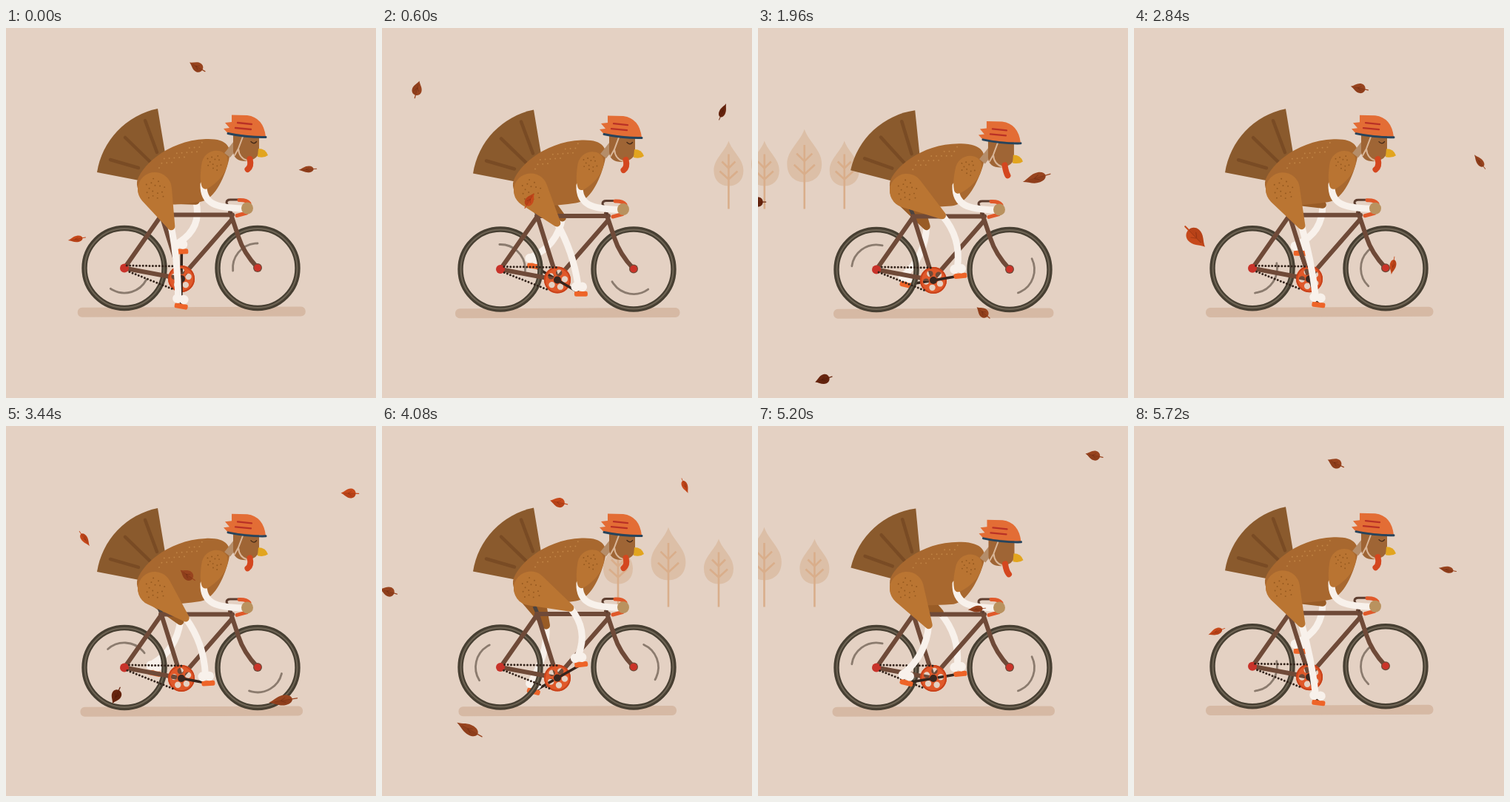
Animation of 500 by 500 pixels, one loop 5760 ms. Source, as an HTML page with a canvas:

```html
<!DOCTYPE html>
<html lang="en">
<head>
<meta charset="utf-8">
<title>Turkey ride</title>
<style>
html, body { margin: 0; width: 100%; height: 100%; overflow: hidden; background: #e4d1c3; }
canvas { display: block; width: 500px; height: 500px; }
</style>
</head>
<body>
<canvas id="stage" width="500" height="500"></canvas>
<script>
const ctx = document.getElementById('stage').getContext('2d');
const LOOP = 5760, TAU = Math.PI * 2, RAD = Math.PI / 180;
const FRAME = '#6f4a38', ORANGE = '#e0592a', WHITE = '#f8f1eb', THIGH = '#ba7532';

function fill(shape, color) {
  ctx.fillStyle = color;
  ctx.fill(typeof shape === 'string' ? new Path2D(shape) : shape, 'evenodd');
}
function line(path, color, width, cap = 'round') {
  ctx.strokeStyle = color;
  ctx.lineWidth = width;
  ctx.lineCap = cap;
  ctx.lineJoin = 'round';
  ctx.stroke(new Path2D(path));
}
function circle(x, y, r) {
  const p = new Path2D();
  p.arc(x, y, r, 0, TAU);
  return p;
}
function ring(x, y, r, color, width, from = 0, to = TAU) {
  ctx.beginPath();
  ctx.arc(x, y, r, from, to);
  ctx.strokeStyle = color;
  ctx.lineWidth = width;
  ctx.lineCap = 'round';
  ctx.stroke();
}
function at(x, y, deg, draw) {
  ctx.save();
  ctx.translate(x, y);
  ctx.rotate(deg * RAD);
  draw();
  ctx.restore();
}
const mix = (a, b, k) => a + (b - a) * k;
function smooth(a, b, t) {
  const k = Math.min(1, Math.max(0, (t - a) / (b - a)));
  return k * k * (3 - 2 * k);
}

// Background trees: [time, middle x at that time, spacing]
const groves = [[1120, 347, 54], [4720, 171, 68]];

function tree(x, size) {
  ctx.save();
  ctx.translate(x, 244.5);
  ctx.scale(size, size);
  fill('M0-92C5-77 20-68 20-52C20-38 11-31 0-31S-20-38-20-52C-20-68-5-77 0-92Z', '#dcbfa7');
  line('M0 0V-74M-12-51L0-40L12-51M-9-64L0-55L9-64', '#d9ae8b', 2.6 / size, 'butt');
  ctx.restore();
}
function trees(t) {
  for (const [t0, x0, gap] of groves) {
    const x = x0 - (t - t0) * 0.338;
    tree(x - gap, 1);
    tree(x, 1.17);
    tree(x + gap, 1);
  }
}

// Leaves: size, a look per key (lower case = seen edge-on), keys of [time, x, y, degrees]
const leaves = [
  [1, 'RRRR', [5040, 510, 34, 10], [5440, 369, 48, 15], [5720, 272, 50, 25], [5760, 258, 52, 30]],
  [1, 'rrO', [5720, 423, 194, 12], [5760, 407, 191, -4], [6880, 21, 268, 230]],
  [1, 'roo', [4720, 465, 219, 10], [5720, 111, 278, -22], [5760, 95, 285, -10]],
  [1, 'dD', [1120, 284, 159, 70], [1960, -2, 235, 0]],
  [1, 'oD', [1120, 374, 400, -70], [1200, 347, 418, -60], [1960, 88, 475, -18]],
  [1.6, 'rO', [1960, 375, 203, -16], [2840, 84, 283, -134]],
  [0.95, 'R', [1960, 304, 384, 40]],
  [1, 'RRo', [2400, 455, 97, -10], [2840, 304, 81, 12], [3440, 107, 153, 235]],
  [1, 'rR', [2840, 467, 180, 52], [3440, 245, 201, 35]],
  [1, 'oD', [2840, 350, 322, -80], [3440, 149, 365, -65]],
  [1, 'OOD', [3440, 464, 91, 2], [3700, 372, 71, 20], [4720, 13, 157, 0]],
  [1.6, 'r', [3440, 373, 371, -9]],
  [0.9, 'o', [4720, 154, 120, -75]]
];
const leafColor = { O: '#c6491b', R: '#98441f', D: '#68260f' };

function leaf(t, [size, looks, ...keys]) {
  let i = 0;
  while (i < keys.length - 2 && t > keys[i + 1][0]) i++;
  const a = keys[i];
  const b = keys[i + 1] || [a[0] + 1000, a[1] - 400, a[2] + 60, a[3] + 60];
  const k = (t - a[0]) / (b[0] - a[0]);
  const [x, y, deg] = [1, 2, 3].map(n => mix(a[n], b[n], k));
  if (x < -30 || x > 530) return;
  const lookA = looks[Math.min(i, looks.length - 1)];
  const lookB = looks[Math.min(i + 1, looks.length - 1)];
  const flat = c => c < 'a' ? 1 : 0.66;
  const squash = mix(flat(lookA), flat(lookB), Math.min(1, Math.max(0, k)));
  at(x, y, deg, () => {
    ctx.scale(size, size * squash);
    const color = leafColor[(k < 0.5 ? lookA : lookB).toUpperCase()];
    fill('M-11 0C-6-2-3-7 3-6.5C7-6 9-3 9 0C9 3 7 6 3 6.5C-3 7-6 2-11 0Z', color);
    fill('M-11 0H9C9 3 7 6 3 6.5C-3 7-6 2-11 0Z', 'rgba(60,10,0,.1)');
    line('M-7 0H13', color, 1.3);
    line('M-6 0H8M-1 0L3-3M-1 0L3 3', 'rgba(50,10,0,.25)', 0.7);
  });
}

function wheel(x, deg) {
  ring(x, 324.5, 54, '#473f32', 7.4);
  ring(x, 324.5, 53.5, '#6e6454', 2);
  ring(x, 324.5, 33.5, '#8b7b6e', 2.8, (deg - 48) * RAD, (deg + 48) * RAD);
}

const CRANK = { x: 237, y: 339, r: 37 };
const pedalAt = a => [CRANK.x + CRANK.r * Math.cos(a), CRANK.y + CRANK.r * Math.sin(a)];

function crankArm(a) {
  const [x, y] = pedalAt(a);
  line(`M${CRANK.x} ${CRANK.y}L${x} ${y}`, '#35251d', 3.6);
}

// Tapered shape around two circles
function taper(x1, y1, r1, x2, y2, r2) {
  const dir = Math.atan2(y2 - y1, x2 - x1);
  const open = Math.acos((r1 - r2) / Math.hypot(x2 - x1, y2 - y1));
  const p = new Path2D();
  p.arc(x1, y1, r1, dir + open, dir - open + TAU);
  p.arc(x2, y2, r2, dir - open, dir + open);
  p.closePath();
  return p;
}

function leg(a, hipX, hipY, near) {
  const sin = Math.sin(a), cos = Math.cos(a);
  const [px, py] = pedalAt(a);
  const bend = (41 + 25 * sin - 8 * cos + 6 * cos * cos) * RAD;
  const len = 58 - 3 * sin;
  const kx = hipX + len * Math.cos(bend), ky = hipY + len * Math.sin(bend);
  const ax = px - 4, ay = py - 12;
  const dx = ax - kx, dy = ay - ky, dist = Math.hypot(dx, dy);
  const bulge = Math.max(0, 105 - dist) * 0.5 / dist;
  line(`M${kx} ${ky}Q${(kx + ax) / 2 + dy * bulge} ${(ky + ay) / 2 - dx * bulge} ${ax} ${ay}`, WHITE, 9);
  at(px, py, 4 + 6 * sin - 9 * cos, () => {
    ctx.beginPath();
    ctx.roundRect(-9, -3.5, 18, 7, 2.5);
    ctx.fillStyle = '#ee6428';
    ctx.fill();
    fill(circle(-7, -9.5, 6.3), WHITE);
    fill(circle(2, -9.5, 6.3), WHITE);
  });
  fill(taper(hipX, hipY, near ? 23 : 20, kx, ky, 5), near ? THIGH : '#995c26');
  if (near) dots(hipX, hipY, 15, 16, '#95591f');
}

// Sunflower scatter of speckles
function dots(x, y, r, count, color) {
  for (let i = 1; i <= count; i++) {
    const d = r * Math.sqrt(i / count), a = i * 2.4;
    fill(circle(x + d * Math.cos(a), y + d * Math.sin(a), 0.95), color);
  }
}

function bike(t, a) {
  const spin = t % 360;
  wheel(160, 75 + spin);
  wheel(340, 221 + spin);
  line('M206 242L212 256', '#4b4340', 5, 'butt');
  line('M160 324.5L210 253L237 339ZM209 252.5H306M237 337L305 259', FRAME, 6);
  line('M303 249L314 282Q321 304 340 324', FRAME, 6);
  line('M304 250L298 236Q298 232 303 232H315', '#5d3e30', 3);
  line('M315 232.5Q325 232 329 237M312 253.5L325 250', ORANGE, 5);
  fill(circle(160, 324.5, 6), '#c8332a');
  fill(circle(340, 324, 6), FRAME);
  fill(circle(340, 324, 4.8), '#cb3429');

  const gear = circle(CRANK.x, CRANK.y, 18);
  for (let i = 0; i < 5; i++) {
    const h = a + Math.PI / 5 + i * TAU / 5;
    gear.addPath(circle(CRANK.x + 10 * Math.cos(h), CRANK.y + 10 * Math.sin(h), 4.2));
  }
  fill(gear, ORANGE);
  ring(CRANK.x, CRANK.y, 17, '#c9421a', 2);
  ctx.setLineDash([0, 4.4]);
  ctx.lineDashOffset = -t * 0.157;
  line('M163 321L237 322', '#33231a', 3);
  ctx.lineDashOffset = t * 0.157;
  line('M163 328L226 353', '#33231a', 3);
  ctx.setLineDash([]);
  crankArm(a);
  fill(circle(CRANK.x, CRANK.y, 5), '#3a2820');
}

function head(lean) {
  line('M299 172L311 157', '#b58d69', 10, 'butt');
  fill('M307 141V167Q308 180 324 180Q342 178 342 165V145Z', '#9f6535');
  line('M320 147L314 163L309 172M314 163Q315 176 326 179', '#d9b698', 2);
  fill('M341 163Q351 163 354 172Q349 176 340 174Z', '#e2a51f');
  line(`M329.5 177Q${332 - lean} 187 ${326.5 + 8 * lean} 191`, '#d4471f', 8);
  if (lean < 0.7) line('M331 153.5Q335 158 338.5 153.5', '#452a18', 1.4);
  fill('M305 117.5L326 118Q348 121 351 147L300 142.500L294 136L302 135L296 128L305 127Z', '#e36d35');
  line('M300 142.500Q325 148 351 147.500', '#27445c', 3);
  line('M313 128L332 130M310 135L331 137', '#b93126', 2.3);
}

function torso() {
  fill('M205 109A104 104 0 0 0 123 195L185 207L216 175Z', '#8a5a2d');
  line('M141 178L179 189M161 148L195 181M188 125L204 168', '#794b24', 4.5);
  fill('M177 208C180 190 216 152 270 150C298 149 306 160 301 179C294 207 280 233 262 235C232 239 214 241 195 233C182 227 176 218 177 208Z', '#a8682f');
  for (let i = 0; i < 18; i++) {
    const x = 207 + i * 3.4;
    fill(circle(x, 186 - i * 1.45 - (i * 7 % 5) * 2.4 + 3, 0.95), '#c08445');
  }
}

function wing() {
  fill('M264 186C266 163 293 160 299 175C303 190 288 208 274 216C270 219 265 218 264 212C262 203 263 194 264 186Z', '#b97432');
  dots(282, 182, 11, 12, '#95591f');
}

function draw(t) {
  const bob = 1 - Math.cos(t / 360 * TAU);
  const a = (90 + t / 2) * RAD;
  const half = t % (LOOP / 2);
  const lean = smooth(1680, 2040, half) - smooth(2340, 2700, half);
  const tilt = part => {
    ctx.save();
    ctx.translate(228, 226 + lean * 1.8);
    ctx.rotate(lean * 0.07);
    ctx.translate(-228, -226);
    part();
    ctx.restore();
  };

  ctx.fillStyle = '#e4d1c3';
  ctx.fillRect(0, 0, 500, 500);
  trees(t);

  ctx.save();
  ctx.translate(0, bob);
  const reach = 149.5 + 4.5 * Math.cos(t / 720 * TAU);
  at(250.75, 383.7, -0.25, () => {
    ctx.beginPath();
    ctx.roundRect(-reach, -6.5, reach * 2, 13, 6);
    ctx.fillStyle = '#d6b9a4';
    ctx.fill();
  });
  crankArm(a + Math.PI);
  leg(a + Math.PI, 198, 217, false);
  bike(t, a);
  tilt(torso);
  leg(a, 201, 218, true);
  line('M267 211C266 238 284 243 320 244', WHITE, 9);
  fill(circle(326, 243.5, 8), '#b9925f');
  tilt(wing);
  at(lean * 4.5, lean * 8 - bob * 0.3, 0, () => head(lean));
  ctx.restore();

  for (const l of leaves) {
    leaf(t, l);
    leaf(t + LOOP, l);
  }
}

function tick() {
  draw(performance.now() % LOOP);
  requestAnimationFrame(tick);
}
tick();
</script>
</body>
</html>
```
